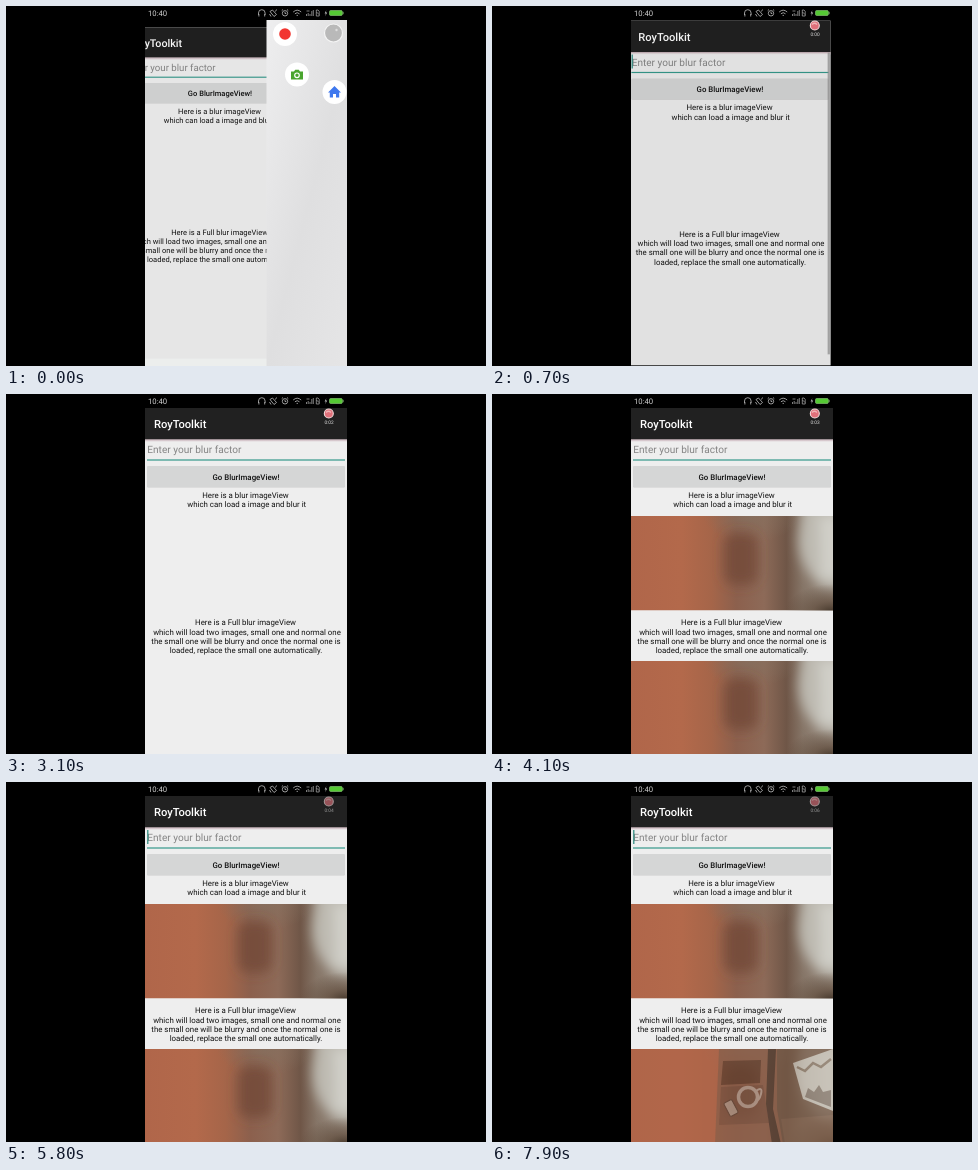
Recreate the animation shown at these times as an HTML page. Size 480 by 360 pixels, loop 8 s.

```html
<!DOCTYPE html>
<html lang="en">
<head>
<meta charset="utf-8">
<title>Blur demo</title>
<style>
  html, body { margin: 0; width: 100%; height: 100%; overflow: hidden; background: #000; }
  svg { display: block; width: 480px; height: 360px; font-family: Roboto, "Open Sans", sans-serif; text-rendering: geometricPrecision; }
  .body { font-size: 7.86px; fill: #111; text-anchor: middle; }
  .line { fill: none; stroke: #b4b4b4; stroke-width: .85; }
</style>
</head>
<body>
<svg viewBox="0 0 480 360">
  <defs>
    <clipPath id="screen"><rect x="139" y="14" width="202" height="346"/></clipPath>
    <clipPath id="frame"><rect width="202" height="94.500"/></clipPath>
    <filter id="soft" x="-20%" y="-20%" width="140%" height="140%"><feGaussianBlur stdDeviation="6"/></filter>
    <linearGradient id="wall">
      <stop offset="0" stop-color="#b0664a"/>
      <stop offset=".25" stop-color="#b3694b"/>
      <stop offset=".4" stop-color="#a56549"/>
      <stop offset=".52" stop-color="#8c604d"/>
      <stop offset=".66" stop-color="#8d6a58"/>
      <stop offset=".77" stop-color="#6f5647"/>
      <stop offset=".85" stop-color="#867567"/>
      <stop offset="1" stop-color="#988c80"/>
    </linearGradient>
    <radialGradient id="mist">
      <stop offset="0" stop-color="#85705f" stop-opacity=".8"/>
      <stop offset="1" stop-color="#85705f" stop-opacity="0"/>
    </radialGradient>
    <radialGradient id="earth">
      <stop offset="0" stop-color="#3f3226" stop-opacity=".95"/>
      <stop offset=".4" stop-color="#5a4535" stop-opacity=".6"/>
      <stop offset="1" stop-color="#5a4535" stop-opacity="0"/>
    </radialGradient>
    <linearGradient id="shade" x2="0" y2="1">
      <stop offset="0" stop-color="#b89ca5"/>
      <stop offset="1" stop-color="#eee6ea" stop-opacity="0"/>
    </linearGradient>
    <linearGradient id="paper" x2="1" y2="1">
      <stop offset="0" stop-color="#eeeeef"/>
      <stop offset=".5" stop-color="#dfdfe0"/>
      <stop offset="1" stop-color="#e6e6e7"/>
    </linearGradient>
    <g id="blur" clip-path="url(#frame)">
      <rect width="202" height="94.500" fill="url(#wall)"/>
      <ellipse cx="120" cy="0" rx="48" ry="26" fill="url(#mist)"/>
      <g filter="url(#soft)">
        <rect x="93" y="17" width="34" height="52" rx="12" fill="#704837" opacity=".75"/>
        <path d="M172-12H216V76L190 70Q166 50 168 20z" fill="#bdbab1"/>
        <path d="M188 0H216V62H190z" fill="#d0cfc8"/>
      </g>
      <ellipse cx="200" cy="96" rx="46" ry="28" fill="url(#earth)"/>
    </g>
  </defs>

  <!-- status bar -->
  <text x="142" y="10" font-size="7.700" fill="#d0d0d0">10:40</text>
  <g class="line">
    <path d="M252.500 9V7a3.300 3.300 0 0 1 6.600 0v2M252.900 8v2.500M258.700 8v2.500"/>
    <path d="M264 5.500l2.500-1.500 4 4.500-2.500 2zM263.500 8l1.500 2.500M270.500 3.500l-1 2"/>
    <circle cx="279" cy="7.300" r="2.700"/><path d="M279 5.800v1.700h1.300M275.700 4.700l1.300-1.200M282.300 4.700l-1.300-1.200"/>
    <path d="M287.200 6q4-3.600 8 0M288.900 7.800q2.300-2.200 4.600 0M290.600 9.400h1.300"/>
    <path d="M300.500 10v-2M302.200 10v-3M304 10v-2M305.800 10v-5M307.300 10v-6M300.500 5h3" stroke-width=".7"/>
    <path d="M310.300 4h1.700l1.200 1.300v4.700h-2.900zM310.500 6l2.500 2.500" stroke-width=".7"/>
  </g>
  <path d="M320.300 4.300l-1.700 3.200h1.300l-.7 2.700 2-3.600h-1.300z" fill="#bbb"/>
  <rect x="323.500" y="4.500" width="12.800" height="5" rx="1.200" fill="#55c934" stroke="#8fca7c" stroke-width=".6"/>
  <rect x="336.700" y="5.800" width=".8" height="2.400" fill="#8fca7c"/>

  <g clip-path="url(#screen)">
    <rect id="foot" x="139" y="351" width="122" height="9" fill="#eceeed"/>
    <g id="app">
      <rect x="139" y="14" width="202" height="346" fill="#eee"/>
      <rect x="139" y="14" width="202" height="31.500" fill="#212121"/>
      <rect x="139" y="45.500" width="202" height="3" fill="url(#shade)"/>
      <text x="148" y="34.200" font-size="11.200" font-weight="500" fill="#fff">RoyToolkit</text>
      <text x="141.300" y="59.300" font-size="10.100" fill="#858585">Enter your blur factor</text>
      <rect id="caret" x="141.200" y="48" width="1.200" height="14" fill="#27877c"/>
      <rect x="141" y="65.400" width="198" height="1.200" fill="#36998c"/>
      <rect x="141" y="73" width="198" height="20.500" rx="1" fill="#b8b8b8" opacity=".6"/>
      <rect x="141" y="72" width="198" height="21" rx="1" fill="#d5d6d6"/>
      <text class="body" x="240" y="85.800" font-weight="500">Go BlurImageView!</text>
      <g id="copy"></g>
      <g id="pics">
        <use href="#blur" x="139" y="122"/>
        <use href="#blur" x="139" y="267"/>
        <g id="photo" transform="translate(139 267)" clip-path="url(#frame)">
          <rect width="202" height="94.500" fill="#b0664a"/>
          <path d="M88 0H202V95H84z" fill="#8d5f4a"/>
          <path d="M92 12l38-1-1 23-39 2z" fill="#63402f"/>
          <path d="M90 38l42-2 6 38-50 2z" fill="#7b5341"/>
          <path d="M137 0l8 0-3 60 8 35h-9l-6-40z" fill="#4f3a2e"/>
          <path d="M146 0H202V95H152l-6-35z" fill="#735745"/>
          <path d="M162 14L202 0V62l-30-12z" fill="#c6bfb4"/>
          <path d="M166 18l8 4 8-8 8 4 10-8" fill="none" stroke="#877463" stroke-width="2.500"/>
          <path d="M174 48l3-9 6 4 5-7 4 7 8-2v17z" fill="#85766a"/>
          <path d="M150 70l52-4V95H154z" fill="#7f604d"/>
          <rect x="-4.500" y="-7.500" width="9" height="15" rx="1.500" transform="translate(100 59) rotate(-28)" fill="#b09a8b" stroke="#5f4436"/>
          <circle cx="117" cy="48" r="9.500" fill="#775341" stroke="#b7a294" stroke-width="3.500"/>
          <path d="M125 42q7-5 5 3t-5 5" fill="none" stroke="#b7a294" stroke-width="2"/>
        </g>
      </g>
      <rect id="bar" x="338" y="46" width="2.300" height="303" fill="#8e8e8e"/>
      <rect id="dim" x="139" y="14" width="202" height="346"/>
    </g>
    <rect id="sheet" y="14" width="90" height="346" fill="url(#paper)"/>
  </g>

  <!-- fan menu -->
  <g id="fan">
    <g fill="#fff">
      <circle cx="279" cy="28" r="12"/><circle cx="291" cy="68.500" r="12"/><circle cx="328.500" cy="86" r="12"/>
    </g>
    <circle cx="279" cy="28" r="5.800" fill="#f23530"/>
    <path d="M285 65.500h3l1.200-1.800h3.600l1.200 1.800h3v8h-12z" fill="#4aa52f"/>
    <circle cx="291" cy="69.300" r="2.300" fill="#4aa52f" stroke="#fff" stroke-width="1.200"/>
    <path d="M322 86.500l6.500-6.500 6.500 6.500h-1.800v5h-3.200v-3.500h-3v3.500h-3.200v-5z" fill="#3f78ee"/>
    <circle cx="327.500" cy="27" r="9" fill="#b9b9b9" stroke="#f4f4f4" stroke-width="1.200"/>
    <circle cx="330.500" cy="24" r="1.200" fill="#ddd"/>
  </g>
  <g id="ball">
    <circle cx="322.800" cy="19.500" r="4.500" fill="#e0707a" stroke="#f3dcdc" stroke-width="1.100"/>
    <path d="M320 18.500q2.500-2.500 5 0" fill="none" stroke="#f0b4b6" stroke-width="1.200"/>
    <text id="clock" x="323" y="30" font-size="4.800" fill="#ddd" text-anchor="middle"></text>
  </g>
</svg>
<script>
  const LOOP = 8000, STEP = 100;
  const $ = id => document.getElementById(id);
  const set = (id, name, value) => $(id).setAttribute(name, value);
  const fade = (id, value) => set(id, "opacity", value);

  const copy = [
    [239.500, 104.100, "Here is a blur imageView"],
    [240.700, 113.400, "which can load a image and blur it"],
    [239.500, 231.200, "Here is a Full blur imageView"],
    [241, 240.500, "which will load two images, small one and normal one"],
    [240, 249.700, "the small one will be blurry and once the normal one is"],
    [240, 258.900, "loaded, replace the small one automatically."]
  ];
  $("copy").innerHTML = copy.map(([x, y, s]) => `<text class="body" x="${x}" y="${y}">${s}</text>`).join("");

  const tracks = {
    shift: [[0, -26], [100, -23], [300, -14], [500, -6.500], [700, -2], [900, 0]],
    scale: [[0, .957], [300, .975], [500, .988], [700, .996], [900, 1]],
    dim: [[0, .03], [100, .09], [300, .15], [900, 0]],
    sheet: [[0, 260.500], [100, 298], [200, 327], [300, 342]],
    fan: [[0, 1], [300, 0]],
    bar: [[900, .7], [1400, 0]],
    ball: [[5300, 1], [5800, .62]],
    photo: [[7300, 0], [7700, .75]]
  };

  function at(name, t) {
    const keys = tracks[name];
    if (t <= keys[0][0]) return keys[0][1];
    for (let i = 1; i < keys.length; i++) {
      const [a, v] = keys[i - 1], [b, w] = keys[i];
      if (t <= b) return v + (w - v) * (t - a) / (b - a);
    }
    return keys[keys.length - 1][1];
  }

  function draw(t) {
    const k = at("scale", t), fan = at("fan", t);
    set("app", "transform", `translate(${240 + at("shift", t)} 187) scale(${k}) translate(-240 -187)`);
    set("sheet", "x", at("sheet", t));
    set("fan", "transform", `translate(323 20) scale(${fan}) translate(-323 -20)`);
    fade("fan", fan);
    fade("foot", t < 100 ? 1 : 0);
    fade("dim", at("dim", t));
    fade("bar", at("bar", t));
    fade("pics", t >= 3600 ? 1 : 0);
    fade("photo", at("photo", t));
    fade("ball", t < 200 ? 0 : at("ball", t));
    fade("caret", Math.floor((t + 400) / 500) % 2 ? 0 : 1);
    $("clock").textContent = "0:0" + Math.max(0, Math.floor((t - 1100) / 1000));
  }

  const start = performance.now();
  function tick() {
    const t = (performance.now() - start) % LOOP;
    draw(Math.floor(t / STEP) * STEP);
    requestAnimationFrame(tick);
  }
  tick();
</script>
</body>
</html>
```
